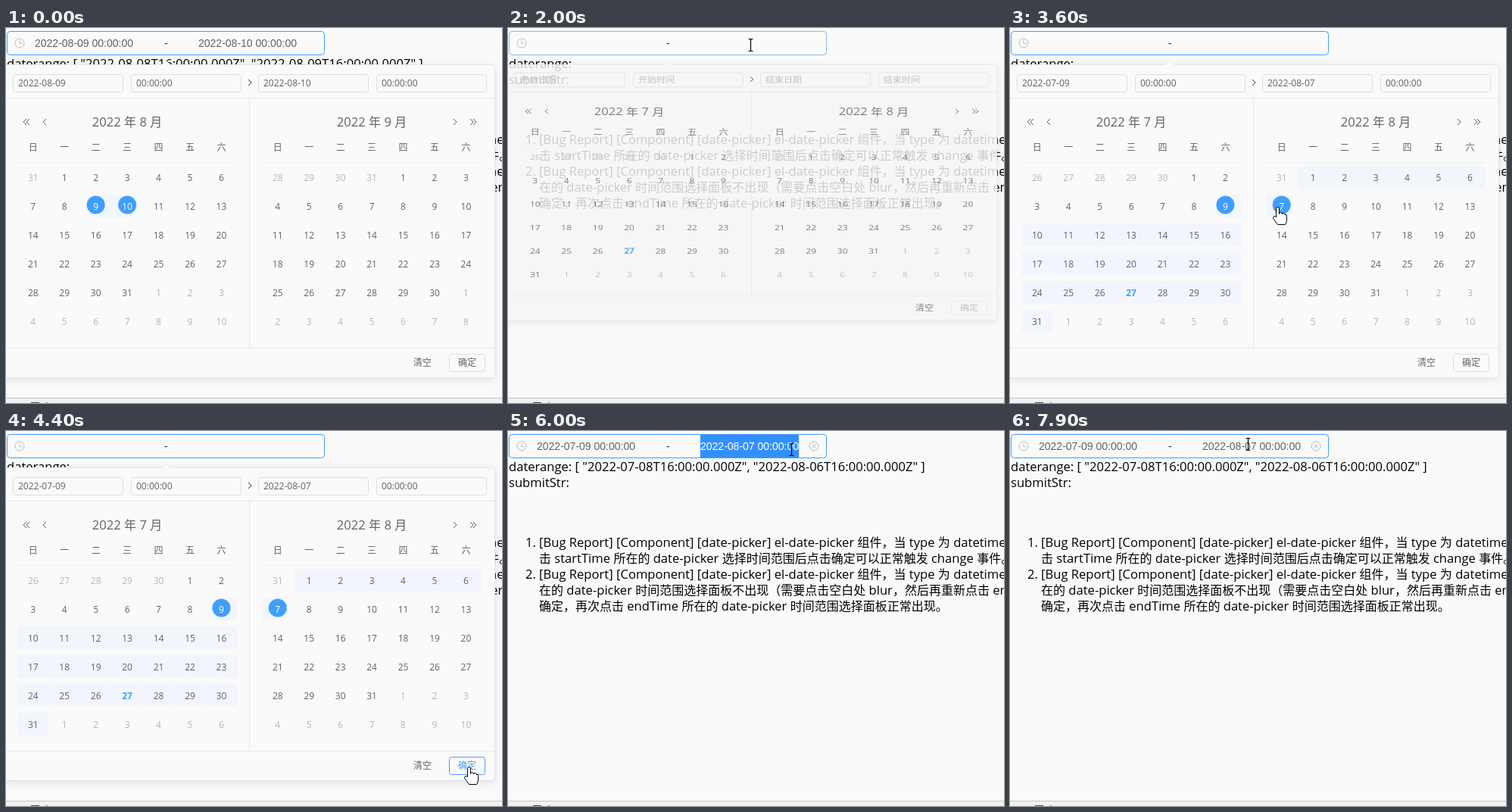
An HTML page with a canvas that plays this animation: 655 px wide and 495 px high, repeating every 8 s.

```html
<!DOCTYPE html>
<html lang="zh">
<head>
<meta charset="utf-8">
<title>Date range picker</title>
<style>
html, body { margin: 0; width: 100%; height: 100%; overflow: hidden; background: #fafafa; }
canvas { display: block; }
</style>
</head>
<body>
<canvas id="stage" width="655" height="495"></canvas>
<script>
const g = document.getElementById('stage').getContext('2d');
const LOOP = 8000, DAY = 864e5;
const BG = '#fafafa', BLUE = '#409eff', GRAY = '#606266', PALE = '#b2b5bc', LINE = '#e4e7ed';
const date = (m, d) => Date.UTC(2022, m, d);
const iso = d => new Date(d).toISOString();

// Latin and CJK runs use different fonts
function text(s, x, y, size, color, align = 'left', weight = '') {
  const runs = s.match(/[\u3000-\uffef]+|[^\u3000-\uffef]+/g) || [];
  const font = r => g.font = r >= '\u3000'
    ? `${weight} ${size}px "Noto Sans CJK SC", "Noto Sans CJK", sans-serif`
    : `${weight} ${size > 12 ? 16.6 : 12}px "Open Sans", "Noto Sans", sans-serif`;
  const widths = runs.map(r => (font(r), g.measureText(r).width));
  const total = widths.reduce((a, b) => a + b, 0);
  x -= total * { left: 0, center: .5, right: 1 }[align];
  g.fillStyle = color;
  runs.forEach((r, i) => { font(r); g.fillText(r, x, y); x += widths[i]; });
}

function label(s, x, color) {
  g.font = '14px "Liberation Sans", Arial, sans-serif';
  g.fillStyle = color;
  g.fillText(s, x, 25);
}

function rect(x, y, w, h, color) {
  g.fillStyle = color;
  g.fillRect(x, y, w, h);
}

function box(x, y, w, h, color, r = 4) {
  g.beginPath();
  g.roundRect(x + .5, y + .5, w - 1, h - 1, r);
  g.strokeStyle = color;
  g.lineWidth = 1;
  g.stroke();
}

function path(d, x, y, stroke, fill, width = 1) {
  const p = new Path2D(d);
  g.save();
  g.translate(x, y);
  if (fill) { g.fillStyle = fill; g.fill(p); }
  g.strokeStyle = stroke;
  g.lineWidth = width;
  g.stroke(p);
  g.restore();
}

// Pointer: time, x, y, shape (a = arrow, h = hand, i = text beam)
const track = [
  [1000, 640, 30, 'a'], [1500, 405, 15, 'h'], [1900, 405, 15, 'h'],
  [2000, 320, 22, 'i'], [2100, 318, 70, 'i'], [2200, 314, 108, 'a'],
  [2500, 296, 195, 'h'], [2800, 286, 235, 'h'], [2900, 286, 235, 'h'],
  [3400, 353, 237, 'h'], [3600, 353, 237, 'h'], [4100, 545, 395, 'a'],
  [4300, 610, 442, 'h'], [4500, 611, 445, 'h'], [4800, 611, 445, 'h'],
  [4900, 611, 444, 'a'], [5300, 611, 444, 'a'], [5600, 555, 368, 'a'],
  [5900, 398, 58, 'a'], [6000, 374, 24, 'i'], [6100, 368, 22, 'i'],
  [6400, 368, 22, 'i'], [6600, 326, 17, 'i'], [7400, 326, 17, 'i'],
  [7500, 314, 17, 'i'], [LOOP, 314, 17, 'i']
];
const shapes = {
  a: 'M0 0V16L4 12.5L7 19L9.5 18L6.5 11.5H11.5Z',
  h: 'M-2 12V1Q-2-1 0-1T2 1V8Q2 6 4 6T6 8.5Q6 7 8 7T10 9.5Q10 8 11 8.5T12 11V16Q12 19 10 22H0Q-2 19-6 14Q-6 11-4 11Z',
  i: 'M-3-8H-1L0-7L1-8H3M0-7V7M-3 8H-1L0 7L1 8H3'
};

function pointerAt(t) {
  const i = track.findLastIndex(k => k[0] <= t);
  if (i < 0) return { x: -99, y: -99 };
  const [t0, x0, y0, shape] = track[i], [t1, x1, y1] = track[i + 1];
  const f = (t - t0) / (t1 - t0);
  return { x: x0 + (x1 - x0) * f, y: y0 + (y1 - y0) * f, shape };
}

const inside = (p, x, y, w, h) => p.x >= x && p.x < x + w && p.y >= y && p.y < y + h;

const bug = '[Bug Report] [Component] [date-picker] el-date-picker 组件，当 type 为 datetimerange';
const notes = [
  bug,
  '击 startTime 所在的 date-picker 选择时间范围后点击确定可以正常触发 change 事件。',
  bug,
  '在的 date-picker 时间范围选择面板不出现（需要点击空白处 blur，然后再重新点击 endTime',
  '确定，再次点击 endTime 所在的 date-picker 时间范围选择面板正常出现。'
];

function drawPage(range) {
  rect(0, 0, 655, 495, BG);
  const list = range ? ` [ "${range.map(d => iso(d - DAY / 3)).join('", "')}" ]` : '';
  text('daterange:' + list, 1, 53, 16, '#000');
  text('submitStr:', 1, 74, 16, '#000');
  text('1.', 37, 153, 16, '#000', 'right');
  text('2.', 37, 195, 16, '#000', 'right');
  notes.forEach((s, i) => text(s, 41, 153 + 21 * i, 16, '#000'));
  rect(0, 488, 655, 7, '#f1f1f1');
  rect(0, 488, 655, 1, '#c8c8c8');
  rect(33, 494, 11, 1, '#444');
  rect(53, 494, 2, 1, '#777');
}

function drawInput(range, border, selection, hover) {
  rect(2, 5, 418, 30, BG);
  box(1, 4, 420, 32, border);
  path('M6 0A6 6 0 1 1-6 0A6 6 0 1 1 6 0M0-3.5V.5H3.5', 18, 20, '#b8bbc2');
  label('-', 209, '#303133');
  if (!range) return;
  const [from, to] = range.map(d => iso(d).slice(0, 10) + ' 00:00:00');
  label(from, 38, GRAY);
  label(to, 254, GRAY);
  if (selection) {
    const [a, b] = selection;
    g.save();
    g.beginPath();
    g.rect(a, 5, b - a, 30);
    g.clip();
    rect(a, 5, b - a, 30, '#3390ff');
    label(to, 254, '#fff');
    g.restore();
  }
  if (hover) path('M6 0A6 6 0 1 1-6 0A6 6 0 1 1 6 0M-2.5-2.5L2.5 2.5M-2.5 2.5L2.5-2.5', 404, 20, '#b8bbc2');
}

function drawMonth(left, month, range, pointer) {
  const cx = i => left + 20.75 + 41.45 * i;
  text(`2022 年 ${month + 1} 月`, left + 145, 130, 16, GRAY, 'center');
  [...'日一二三四五六'].forEach((s, i) => text(s, cx(i), 162, 12, GRAY, 'center'));
  rect(left, 177, 290, 1, '#eff1f5');
  const first = date(month, 1 - new Date(date(month, 1)).getUTCDay());
  for (let i = 0; i < 42; i++) {
    const d = first + i * DAY, when = new Date(d);
    const x = cx(i % 7), y = 197 + 38 * Math.floor(i / 7);
    const current = when.getUTCMonth() === month;
    let color = current ? GRAY : PALE, weight = '';
    if (current && d === date(6, 27)) { color = BLUE; weight = 'bold'; }
    if (current && pointer.shape === 'h' && inside(pointer, x - 20, y - 15, 40, 30)) color = BLUE;
    if (current && range && d >= range[0] && d <= range[1]) {
      const l = d === range[0] ? 14 : 20.75, r = d === range[1] ? 14 : 20.75;
      const a = l < 20 ? 14 : 0, b = r < 20 ? 14 : 0;
      g.fillStyle = '#f2f6fc';
      g.beginPath();
      g.roundRect(x - l, y - 15, l + r, 30, [a, b, b, a]);
      g.fill();
      if (a || b) {
        g.fillStyle = BLUE;
        g.beginPath();
        g.arc(x, y + .5 - 2, 12, 0, 7);
        g.fill();
        color = '#fff';
      }
    }
    text(String(when.getUTCDate()), x, y + 5, 12, color, 'center', weight);
  }
}

function drawPanel(month, range, ready, pointer, open) {
  g.save();
  g.globalAlpha = open;
  g.translate(0, 48);
  g.scale(1, open);
  g.translate(0, -48);

  g.save();
  g.shadowColor = 'rgba(0,0,0,.1)';
  g.shadowBlur = 12;
  g.shadowOffsetY = 2;
  g.fillStyle = BG;
  g.beginPath();
  g.roundRect(-6, 48, 652, 414, 4);
  g.fill();
  g.restore();
  box(-6, 48, 652, 414, LINE);
  path('M-6 1L0-5L6 1', 211, 48, '#ebeef5', BG);
  rect(0, 92, 645, 1, LINE);
  rect(321, 93, 1, 329, LINE);
  rect(0, 422, 645, 1, LINE);

  const hints = ['开始日期', '开始时间', '结束日期', '结束时间'];
  [9, 165, 333, 489].forEach((x, i) => {
    box(x, 61, 146, 24, '#dcdfe6', 3);
    const value = range && (i % 2 ? '00:00:00' : iso(range[i / 2]).slice(0, 10));
    text(value || hints[i], x + 7, 77, 12, value ? GRAY : PALE);
  });
  const back = 'M2-4L-2 0L2 4', next = 'M-2-4L2 0L-2 4';
  path(next, 322, 72, '#303133');
  for (const x of [25, 29, 51]) path(back, x, 124, GRAY);
  for (const x of [593, 615, 619]) path(next, x, 124, GRAY);

  drawMonth(15, month, range, pointer);
  drawMonth(338, month + 1, range, pointer);

  const hot = ready && inside(pointer, 585, 430, 48, 24);
  text('清空', 550, 446, 12, GRAY, 'center');
  box(585, 430, 48, 24, hot ? BLUE : ready ? '#dcdfe6' : LINE, 3);
  text('确定', 609, 446, 12, hot ? BLUE : ready ? GRAY : PALE, 'center');
  g.restore();
}

function selectionAt(t) {
  if (t < 4900 || t >= 7800) return null;
  if (t < 6300 || t >= 7100) return [254, 384];
  if (t < 6800) return null;
  return t < 6900 ? [326, 365] : [326, 330];
}

function draw(t) {
  const pointer = pointerAt(t);
  const before = [date(7, 9), date(7, 10)], after = [date(6, 9), date(7, 7)];
  const done = t >= 4900;
  const hover = inside(pointer, 1, 4, 420, 32);
  const border = t >= 800 && t < 2000 ? (hover ? '#c0c4cc' : '#dcdfe6') : t === 2000 ? '#8db8ea' : BLUE;

  drawPage(t < 2000 ? before : done ? after : null);
  drawInput(t < 1700 ? before : done ? after : null, border, selectionAt(t), hover);
  if (t < 800) drawPanel(7, before, true, pointer, 1);
  else if (t >= 2000 && !done) {
    const range = t < 3000 ? null : t < 3200 ? [after[0], after[0]] : after;
    drawPanel(6, range, t >= 3600, pointer, t < 2100 ? .816 : 1);
  }
  if (pointer.shape) {
    const beam = pointer.shape === 'i';
    path(shapes[pointer.shape], Math.round(pointer.x) + .5, Math.round(pointer.y) + .5,
      '#000', beam ? null : '#fff', beam ? 1.2 : 1);
  }
}

const start = performance.now();
function tick() {
  const t = (performance.now() - start) % LOOP;
  draw(Math.floor(t / 100) * 100);
  requestAnimationFrame(tick);
}
tick();
</script>
</body>
</html>
```
